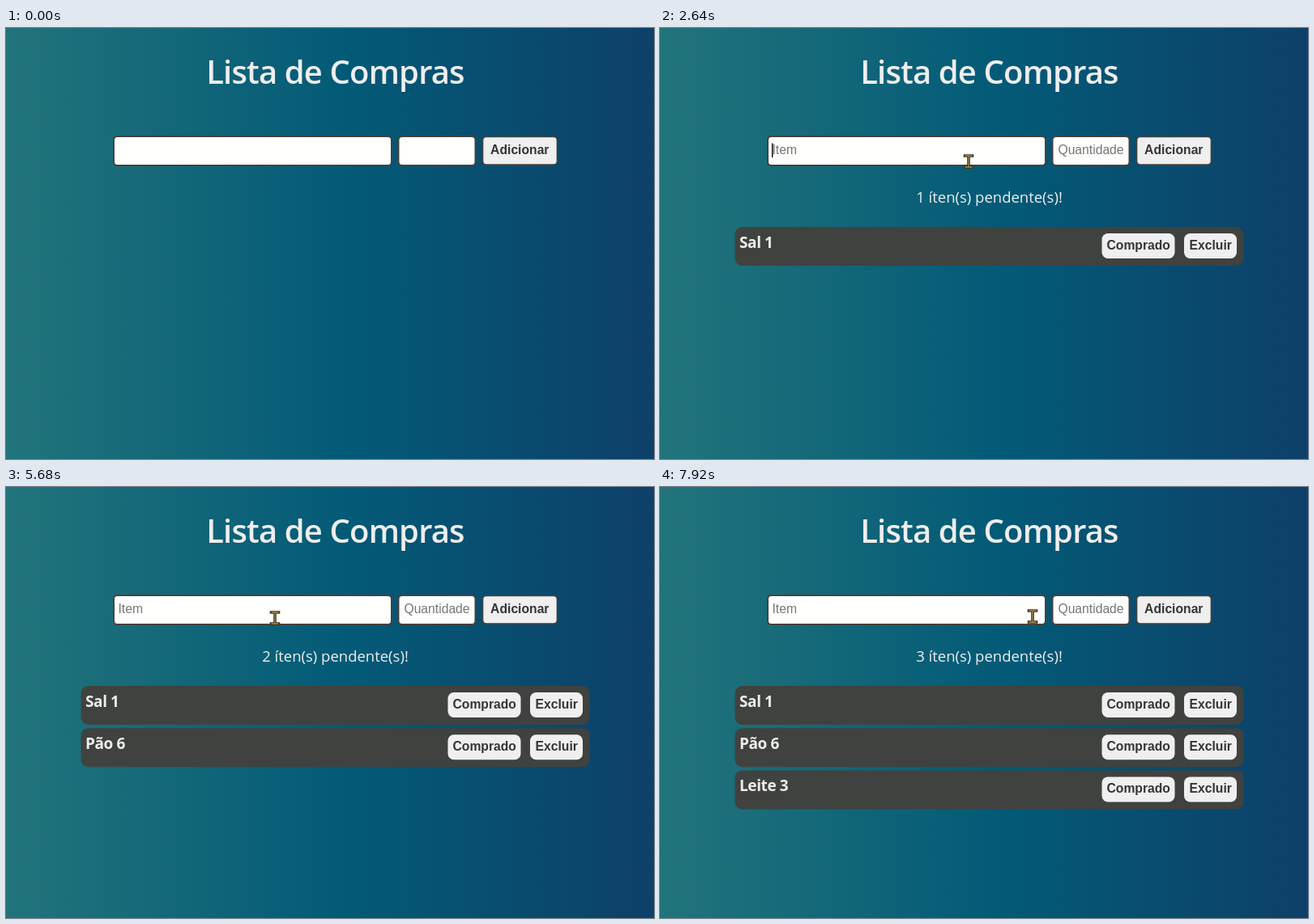
Animation, 800 px wide and 533 px high, one loop 8000 ms. Source, as an HTML page:

```html
<!DOCTYPE html>
<html lang="pt">
<head>
<meta charset="utf-8">
<title>Lista de Compras</title>
<style>
html, body { margin: 0; width: 100%; height: 100%; overflow: hidden; }
body { background: linear-gradient(90deg, #22747b, #035a77 53%, #0e4069); }
svg { display: block; width: 800px; height: 533px; }
text { font: 15.7px "Liberation Sans", Arial, sans-serif; fill: #111; white-space: pre; }
.mid { text-anchor: middle; }
.hint { fill: #757575; }
.bold { font-weight: 700; fill: #353535; }
.head, .note, .name { font-family: "Open Sans", "Noto Sans", sans-serif; fill: #eee; }
.head { font-size: 40px; font-weight: 600; letter-spacing: -.85px; }
.note { font-size: 18.5px; font-weight: 500; }
.name { font-size: 19px; font-weight: 700; letter-spacing: -.4px; }
.field { fill: #fffffe; stroke: #45413e; stroke-width: 2; }
.btn { fill: #efefef; }
.row { fill: #40423f; }
</style>
</head>
<body>
<svg id="stage" viewBox="0 0 800 533"></svg>
<script>
const LOOP = 8000, FRAME = 80;
const stage = document.getElementById('stage');
const opts = { duration: LOOP, iterations: Infinity };

function add(tag, attrs, parent = stage) {
  const el = document.createElementNS('http://www.w3.org/2000/svg', tag);
  for (const k in attrs) el.setAttribute(k, attrs[k]);
  parent.append(el);
  return el;
}
function box(cls, x, y, width, height, rx, parent) {
  return add('rect', { class: cls, x, y, width, height, rx }, parent);
}
function label(cls, x, y, str, parent) {
  const el = add('text', { class: cls, x, y }, parent);
  el.textContent = str;
  return el;
}
// Visible only inside the given [from, to] spans.
function show(el, ...spans) {
  const keys = [{ offset: 0, opacity: 0 }];
  for (const [from, to] of spans)
    keys.push({ offset: from / LOOP, opacity: 1 }, { offset: to / LOOP, opacity: 0 });
  if (keys[keys.length - 1].offset < 1) keys.push({ offset: 1, opacity: 0 });
  keys.forEach(k => k.easing = 'steps(1, end)');
  el.animate(keys, opts);
}
// Moves through [time, x, y] points, one step per frame.
function travel(el, points) {
  el.animate(points.map(([t, x, y], i) => {
    const next = points[i + 1];
    const n = next ? Math.max(1, Math.round((next[0] - t) / FRAME)) : 1;
    return { offset: t / LOOP, transform: `translate(${x}px, ${y}px)`, easing: `steps(${n}, end)` };
  }), opts);
}

label('head mid', 406.5, 69, 'Lista de Compras');
box('field', 133, 134, 343, 36, 4.5);
box('field', 484.5, 134, 95, 36, 4.5);

// Each round: item, quantity, key times, quantity time, row time
const rounds = [
  { name: 'Sal', qty: 1, keys: [560, 720, 880], qtyAt: 1680, added: 2240 },
  { name: 'Pão', qty: 6, keys: [2800, 2960, 3120], qtyAt: 4080, added: 4640 },
  { name: 'Leite', qty: 3, keys: [5920, 6080, 6240, 6400, 6560], qtyAt: 7040, added: 7440 }
];
let idle = 0;
const itemGaps = [], qtyGaps = [];

rounds.forEach((r, i) => {
  r.keys.forEach((t, k) => {
    const end = r.keys[k + 1] || r.added;
    show(label('', 134.5, 156, r.name.slice(0, k + 1)), [t, end]);
  });
  show(label('mid', 532, 156, r.qty), [r.qtyAt, r.added]);
  itemGaps.push([idle, r.keys[0]]);
  qtyGaps.push([idle, r.qtyAt]);
  idle = r.added;

  const until = rounds[i + 1] ? rounds[i + 1].added : LOOP;
  show(label('note mid', 406.5, 215.5, `${i + 1} íten(s) pendente(s)!`), [r.added, until]);

  const row = add('g', {}), y = 246 + i * 52.2;
  box('row', 92.5, y, 628, 48, 9, row);
  label('name', 98, y + 26, `${r.name} ${r.qty}`, row);
  box('btn', 545.5, y + 8, 90, 31, 7.5, row);
  label('bold mid', 590.7, y + 28, 'Comprado', row);
  box('btn', 647, y + 8, 65, 31, 7.5, row);
  label('bold mid', 679.7, y + 28, 'Excluir', row);
  show(row, [r.added, LOOP]);
});
itemGaps.push([idle, LOOP]);
qtyGaps.push([idle, LOOP]);
show(label('hint', 138.5, 156, 'Item'), ...itemGaps);
show(label('hint mid', 532, 156, 'Quantidade'), ...qtyGaps);

function caret(x, ...spans) {
  show(box('', x, 142.5, 1.4, 17.5, 0), ...spans);
}
caret(532, [1440, 1680], [3440, 3680], [3920, 4080], [6960, 7040]);
caret(138, [320, 560], [2640, 2800], [5760, 5920]);
caret(157.5, [880, 1040]);
caret(162.5, [3120, 3440]);
caret(168.5, [6560, 6720]);

// Button and its hover look
box('btn', 588.5, 134.5, 92, 34.5, 4.5).setAttribute('style', 'stroke:#45413e;stroke-width:1.7');
label('bold mid', 634.3, 156, 'Adicionar');
const hover = add('g', {});
box('row', 588, 134.3, 93, 35, 5, hover).setAttribute('style', 'stroke:#3fe0dd;stroke-width:2');
label('bold mid', 634.3, 156, 'Adicionar', hover).style.fill = '#f0f0f0';
show(hover, [2000, 2320], [4320, 4960], [7280, 7600]);

// Pointer: I-beam over fields, arrow elsewhere
const pointer = add('g', {});
const beam = add('g', {}, pointer), arrow = add('g', {}, pointer);
const bar = 'M-4.5-7H4.5M0-7V7M-4.5 7H4.5';
add('path', { d: bar, fill: 'none', stroke: '#3b3020', 'stroke-width': 3.6, 'stroke-linecap': 'square' }, beam);
add('path', { d: bar, fill: 'none', stroke: '#a28950', 'stroke-width': 1.3 }, beam);
add('path', {
  d: 'M0-8V6L3.2 3.3 5.5 8.5 8 7.4 5.8 2.3H10Z',
  fill: '#e9c47c', stroke: '#3b3020', 'stroke-width': 1.2, 'stroke-linejoin': 'round'
}, arrow);
const onButton = [[1920, 2400], [4240, 5040], [7200, 7680]];
show(arrow, ...onButton);
show(beam, [0, 1920], [2400, 4240], [5040, 7200], [7680, LOOP]);
travel(pointer, [
  [0, 372, 157], [960, 372, 157], [1360, 542, 170], [1760, 542, 170],
  [2000, 655, 156], [2240, 655, 156], [2480, 381, 165], [3360, 381, 165],
  [3440, 541, 154], [4160, 541, 154], [4400, 667, 154], [4880, 667, 154],
  [5280, 332, 162], [6800, 332, 162], [6960, 541, 158], [7120, 541, 158],
  [7280, 660, 156], [7520, 660, 156], [7840, 460, 160], [8000, 460, 160]
]);
</script>
</body>
</html>
```
